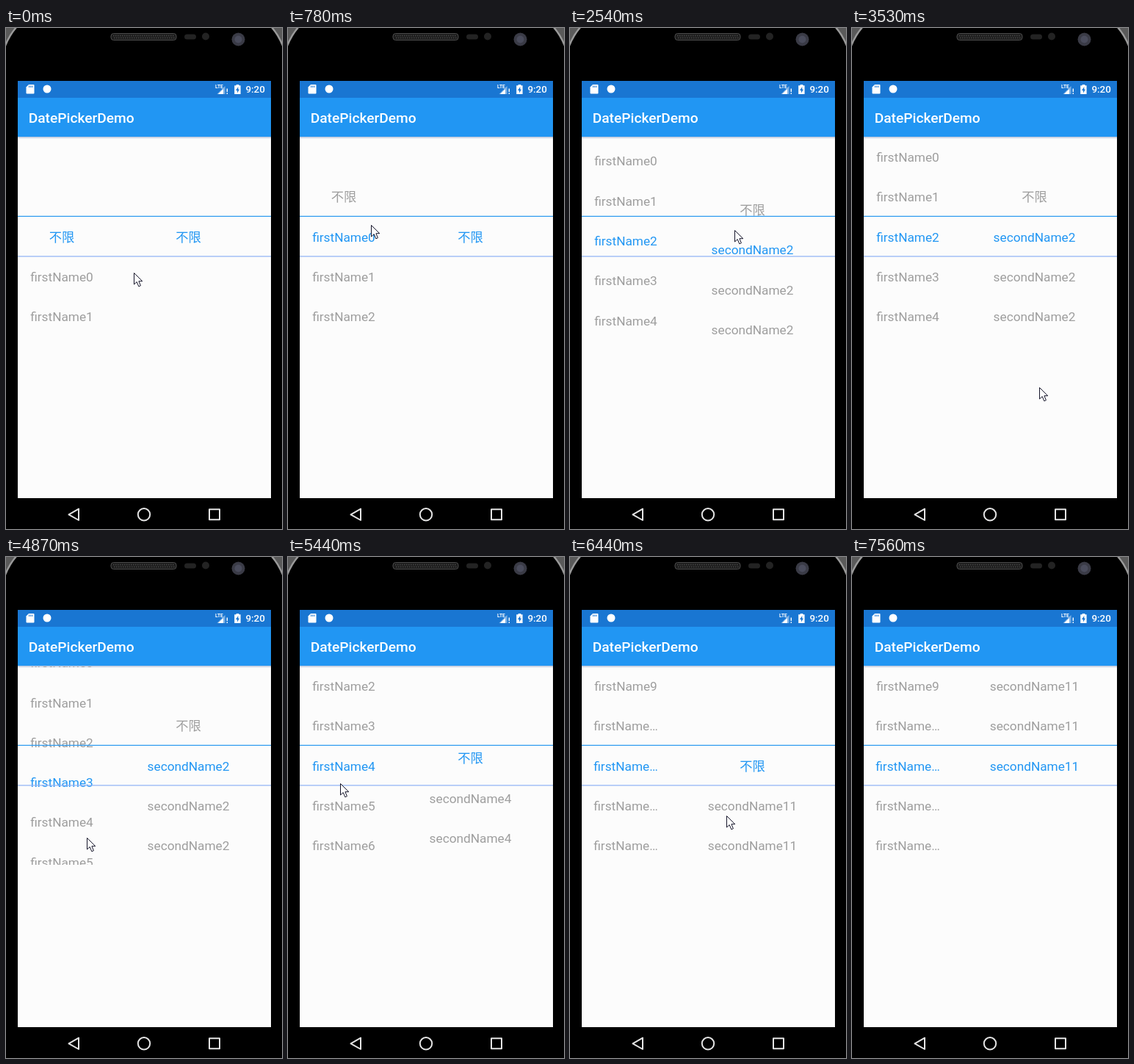
These frames come from a looping animation (376 px wide and 682 px high, 7840 ms). An HTML page:

```html
<!DOCTYPE html>
<html lang="zh-CN">
<head>
<meta charset="utf-8">
<title>DatePickerDemo</title>
<style>
  html, body { margin: 0; width: 100%; height: 100%; overflow: hidden; background: #000; }
  svg { display: block; width: 376px; height: 682px; }
  text { font-family: Roboto, "Noto Sans CJK SC", "Noto Sans CJK JP", sans-serif; }
  .bar { font-weight: 500; fill: #fff; }
  .row { font-size: 17.25px; text-anchor: middle; }
</style>
</head>
<body>
<svg viewBox="0 0 376 682">
  <defs>
    <linearGradient id="shade" x2="0" y2="1">
      <stop offset="0" stop-color="#b4c0d8"/>
      <stop offset="1" stop-color="#fcfcfc"/>
    </linearGradient>
    <clipPath id="list"><rect x="16" y="149" width="345" height="270"/></clipPath>
  </defs>

  <!-- phone body -->
  <rect width="376" height="682"/>
  <g id="corner">
    <path d="M0 0H13C8 6 3 14 0 23Z" fill="#5a5a5a"/>
    <path d="M14 -1C8 6 3 14 -1 24" fill="none" stroke="#9a9a9a" stroke-width="2.5"/>
  </g>
  <use href="#corner" transform="matrix(-1 0 0 1 376 0)"/>
  <rect x="143" y="7.5" width="89" height="9" rx="3.5" fill="#1c1c1c" stroke="#4c4c4c"/>
  <path d="M146 10.5H230M147 13.5H230" stroke="#484848" stroke-width="1.4" stroke-dasharray="1.5 1.5"/>
  <rect x="243" y="8.5" width="16" height="7" rx="3.5" fill="#232323"/>
  <circle cx="272" cy="11.5" r="5" fill="#232323"/>
  <circle cx="316.5" cy="15.5" r="9" fill="#3a3b46"/>
  <circle cx="316.5" cy="15.5" r="5" fill="#4a4c5c"/>

  <!-- screen -->
  <rect x="16" y="148" width="345" height="492" fill="#fcfcfc"/>
  <rect x="16" y="72" width="345" height="23" fill="#1976d2"/>
  <rect x="16" y="95" width="345" height="53" fill="#2196f3"/>
  <rect x="16" y="148" width="345" height="3" fill="url(#shade)"/>
  <text class="bar" x="30.7" y="129" font-size="19.17">DatePickerDemo</text>

  <!-- status icons -->
  <path d="M31 77H37.5Q38.5 77 38.5 78V88.5Q38.5 89.5 37.5 89.5H28.5Q27.5 89.5 27.5 88.5V80.5Z" fill="#fff"/>
  <path d="M31.6 78.5V81M33.7 78.5V81M35.8 78.5V81" stroke="#1976d2"/>
  <circle cx="56" cy="83" r="5.5" fill="#fff"/>
  <text class="bar" x="285" y="81.6" font-size="6.6" style="font-weight:700">LTE</text>
  <path d="M298.5 79V90H287.5Z" fill="#fff" opacity=".45"/>
  <path d="M296 83V90H289Z" fill="#fff"/>
  <path d="M301.3 82.5V87M301.3 88.3V90" stroke="#fff" stroke-width="1.4"/>
  <path d="M313.7 77H317.3V78.3H319.6V90H311.2V78.3H313.7Z" fill="#fff"/>
  <path d="M316.3 80L313 85H315V88.6L318 83.6H316.3Z" fill="#1976d2"/>
  <text class="bar" x="326.4" y="88" font-size="13.4">9:20</text>

  <!-- picker -->
  <g id="rows" clip-path="url(#list)"></g>
  <path d="M16 256.3H361" stroke="#2f9bf0" stroke-width="1.3"/>
  <path d="M16 310.8H361" stroke="#92b4f6" stroke-width="1.3"/>

  <!-- navigation -->
  <g fill="none" stroke="#e4e4e4" stroke-width="2" stroke-linejoin="round">
    <path d="M85.5 662.3L99 654.6V670Z"/>
    <circle cx="188" cy="662.3" r="8.2"/>
    <rect x="277" y="655.3" width="14" height="14"/>
  </g>

  <path id="cursor" d="M.5 .5V16L4.2 12.6L6.8 18.8L9.4 17.7L6.9 11.7H11.8Z"
        fill="#fff" stroke="#15152a"/>
</svg>

<script>
const LOOP = 7840, PITCH = 54.3, BASE = 290.7;
const BLUE = '#2196f3', GREY = '#9e9e9e';

const smooth = p => p * p * (3 - 2 * p);
const glide = p => 1 - (1 - p) ** 3;
const snap = p => 1 + 4 * (p - 1) ** 3 + 3 * (p - 1) ** 2; // a quarter row too far, then back

// each burst of activity advances in even steps: [first, last, count]
const BURSTS = [
  [280, 780, 5], [1050, 1680, 6], [1830, 1980, 2], [2110, 3080, 8],
  [3230, 3920, 6], [4450, 5440, 8], [5570, 6590, 8], [6740, 7560, 7]
];
const STEPS = [0, ...BURSTS.flatMap(([a, b, n]) =>
  Array.from({ length: n }, (_, i) => Math.floor((a + (b - a) * i / (n - 1)) / 10) * 10))];

// scroll gestures: [start, end, row reached, easing]
const FIRST = [
  [280, 780, 1, snap], [1990, 2826, 3, glide], [4800, 5440, 5, glide], [5570, 6400, 12, glide]
];
const SECOND = [
  [1380, 1980, 1, snap], [2367, 2767, 0, smooth], [2950, 3500, 1, snap],
  [5152, 5552, 0, smooth], [6600, 7420, 10, glide]
];
// moments when the second column reloads for the row chosen in the first
const RELOADS = [1050, 2367, 5152, 6400];

// pointer stops: [time, x, y]
const POINTER = [
  [0, 174, 333], [400, 88, 338], [650, 90, 262], [1420, 226, 298], [1680, 227, 230],
  [1980, 95, 325], [2240, 94, 225], [2520, 224, 275], [2800, 232, 315], [3230, 238, 205],
  [3500, 255, 489], [4450, 335, 653], [4730, 120, 400], [5440, 71, 308], [5860, 80, 54],
  [6440, 213, 352], [7010, 190, 156], [7420, 136, 384], [7560, 390, 700]
];

function scrollAt(gestures, t) {
  let pos = 0;
  for (const [start, end, to, ease] of gestures) {
    if (t < start) break;
    pos += (to - pos) * ease(Math.min(1, (t - start) / (end - start)));
  }
  return pos;
}

function pointerAt(t) {
  const i = POINTER.findIndex(k => k[0] > t);
  if (i < 0) return POINTER[POINTER.length - 1].slice(1);
  const [t0, x0, y0] = POINTER[i - 1], [t1, x1, y1] = POINTER[i];
  const p = (t - t0) / (t1 - t0);
  return [x0 + (x1 - x0) * p, y0 + (y1 - y0) * p];
}

const holder = document.getElementById('rows');
const cursor = document.getElementById('cursor');

function makeColumn(x) {
  return Array.from({ length: 7 }, () => {
    const el = document.createElementNS('http://www.w3.org/2000/svg', 'text');
    el.setAttribute('class', 'row');
    el.setAttribute('x', x);
    return holder.appendChild(el);
  });
}
const left = makeColumn(76), right = makeColumn(248.5);

function drawColumn(cells, scroll, count, label) {
  const mid = Math.round(scroll);
  cells.forEach((el, k) => {
    const i = mid + k - 3;
    el.textContent = i < 0 || i >= count ? '' : i === 0 ? '不限' : label(i - 1);
    el.setAttribute('y', (BASE + (i - scroll) * PITCH).toFixed(2));
    el.setAttribute('fill', i === mid ? BLUE : GREY);
  });
}

function draw(now) {
  const t = STEPS.filter(s => s <= now).pop();
  const reload = RELOADS.filter(r => r <= t).pop();
  const group = reload ? Math.round(scrollAt(FIRST, reload)) - 1 : 0;
  drawColumn(left, scrollAt(FIRST, t), 30, n => 'firstName' + (n > 9 ? '…' : n));
  drawColumn(right, scrollAt(SECOND, t), reload ? 11 : 1, () => 'secondName' + group);
  const [x, y] = pointerAt(t);
  cursor.setAttribute('transform', `translate(${Math.round(x)} ${Math.round(y)})`);
}

function tick() {
  draw(performance.now() % LOOP);
  requestAnimationFrame(tick);
}
tick();
</script>
</body>
</html>
```
